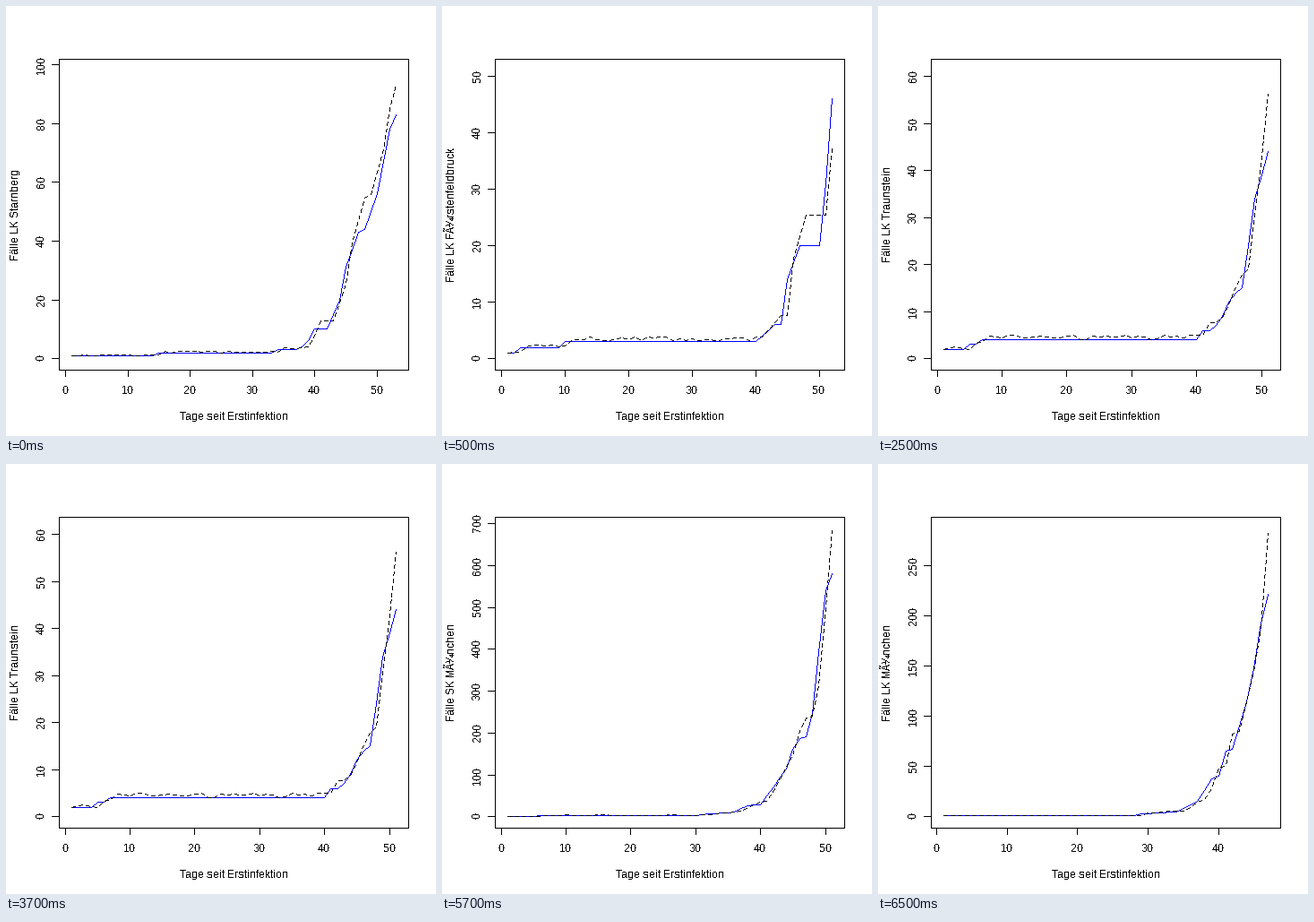
Write a matplotlib script that moves like this. It is 480 px wide and 480 px high and loops after 8 s.

```python
import numpy as np
import matplotlib.pyplot as plt
from matplotlib.animation import FuncAnimation

SIZE, DPI = 480, 100
LEFT, RIGHT, TOP, BOTTOM = 59.04, 449.76, 59.04, 406.56
PAD = 0.04 / 1.08  # share of the plot kept free on each side
BLACK, BLUE = (0, 0, 0), (0, 0, 255)
GROWTH = 1.27      # expected daily growth of the cases

plt.rcParams.update({
    "font.family": "Liberation Sans",
    "font.size": 12 * 72 / DPI,
    "text.hinting": "native",
    "text.hinting_factor": 1,
    "text.antialiased": False,
})
fig = plt.figure(figsize=(SIZE / DPI, SIZE / DPI), dpi=DPI, facecolor="white")
ax = fig.add_axes([0, 0, 1, 1])
ax.axis("off")


def draw_line(canvas, xs, ys, color=BLACK, on=1, period=1):
    """Draw a one pixel wide polyline, dashed if on < period."""
    xs, ys = np.floor(xs), np.floor(ys)
    travelled = 0
    for x0, y0, x1, y1 in zip(xs, ys, xs[1:], ys[1:]):
        t = np.linspace(0, 1, int(max(abs(x1 - x0), abs(y1 - y0))) + 1)
        length = np.hypot(x1 - x0, y1 - y0)
        shown = (travelled + t * length) % period < on
        px = np.floor(x0 + t * (x1 - x0) + 0.5).astype(int)[shown]
        py = np.floor(y0 + t * (y1 - y0) + 0.5).astype(int)[shown]
        canvas[py, px] = color
        travelled += length


def label(x, y, text, rotation=0):
    return ax.text(x, y, text, rotation=rotation, rotation_mode="anchor",
                   ha="center", va="baseline")


def forecast(cases, peak, seed):
    """Yesterday's cases times the growth, which is unsteady early on."""
    rng = np.random.default_rng(seed)
    days = np.arange(2, len(cases) + 1)
    growth = np.where(days < 40, rng.uniform(1, 1.28, len(days)), GROWTH)
    model = np.append(cases[0], cases[:-1] * growth)
    model[-1] = peak
    return model


def chart(name, y_step, peak, key_points):
    """Draw one district and return its artists."""
    key_days, key_cases = zip(*key_points)
    days = np.arange(1, key_days[-1] + 1)
    cases = np.round(np.interp(days, key_days, key_cases))
    model = forecast(cases, peak, seed=len(name))
    y_max = max(cases[-1], peak) + 5

    def px(day):
        share = (day - 1) / (len(days) - 1)
        return LEFT + (RIGHT - LEFT) * (PAD + share / 1.08)

    def py(value):
        return BOTTOM - (BOTTOM - TOP) * (PAD + value / y_max / 1.08)

    canvas = np.full((SIZE, SIZE, 3), 255, np.uint8)
    draw_line(canvas, [LEFT, RIGHT, RIGHT, LEFT, LEFT],
              [TOP, TOP, BOTTOM, BOTTOM, TOP])
    draw_line(canvas, px(days), py(cases), BLUE)
    draw_line(canvas, px(days), py(model), on=5, period=8)

    parts = [label(14, 232.8, name, 90)]
    for day in range(0, len(days) + 1, 10):
        x = px(day)
        draw_line(canvas, [x, x], [BOTTOM, BOTTOM + 7.2])
        parts.append(label(np.floor(x), 433, str(day)))
    value = 0
    while py(value) > TOP:
        y = py(value)
        draw_line(canvas, [LEFT, LEFT - 7.2], [y, y])
        parts.append(label(43, np.floor(y), str(value), 90))
        value += y_step

    parts.append(ax.imshow(canvas, extent=(0, SIZE, SIZE, 0), aspect="auto",
                           interpolation="nearest"))
    return parts


label(254, 462, "Tage seit Erstinfektion")
charts = [
    chart("Fälle LK Starnberg", 20, 93,
          [(1, 1), (14, 1), (15, 2), (33, 2), (34, 3), (37, 3), (39, 6),
           (40, 10), (42, 10), (44, 20), (45, 31), (47, 43), (48, 44),
           (50, 56), (52, 78), (53, 83)]),
    chart("Fälle LK FÃ¼rstenfeldbruck", 10, 37.3,
          [(1, 1), (2, 1), (3, 2), (9, 2), (10, 3), (40, 3), (43, 6), (44, 6),
           (45, 14), (47, 20), (50, 20), (51, 31), (52, 46)]),
    chart("Fälle LK Traunstein", 10, 56.3,
          [(1, 2), (4, 2), (5, 3), (6, 3), (7, 4), (40, 4), (41, 6), (42, 6),
           (43, 7), (46, 14), (47, 15), (49, 34), (51, 44)]),
    chart("Fälle SK MÃ¼nchen", 100, 684.3,
          [(1, 1), (5, 1), (6, 3), (30, 3), (36, 11), (38, 27), (40, 29),
           (44, 115), (45, 161), (46, 186), (47, 190), (48, 246), (50, 540),
           (51, 582)]),
    chart("Fälle LK MÃ¼nchen", 50, 282,
          [(1, 1), (28, 1), (29, 3), (34, 5), (37, 15), (39, 38), (40, 40),
           (41, 65), (42, 67), (44, 114), (45, 147), (46, 193), (47, 221)]),
]
ax.set_xlim(0, SIZE)
ax.set_ylim(SIZE, 0)


def update(frame):
    # The first chart stays half a second, each later one two seconds.
    current = (frame + 3) // 4
    for index, parts in enumerate(charts):
        for part in parts:
            part.set_visible(index == current)
    return [part for parts in charts for part in parts]


animation = FuncAnimation(fig, update, frames=16, interval=500, repeat=True,
                          repeat_delay=0, blit=False)
plt.show()
```
